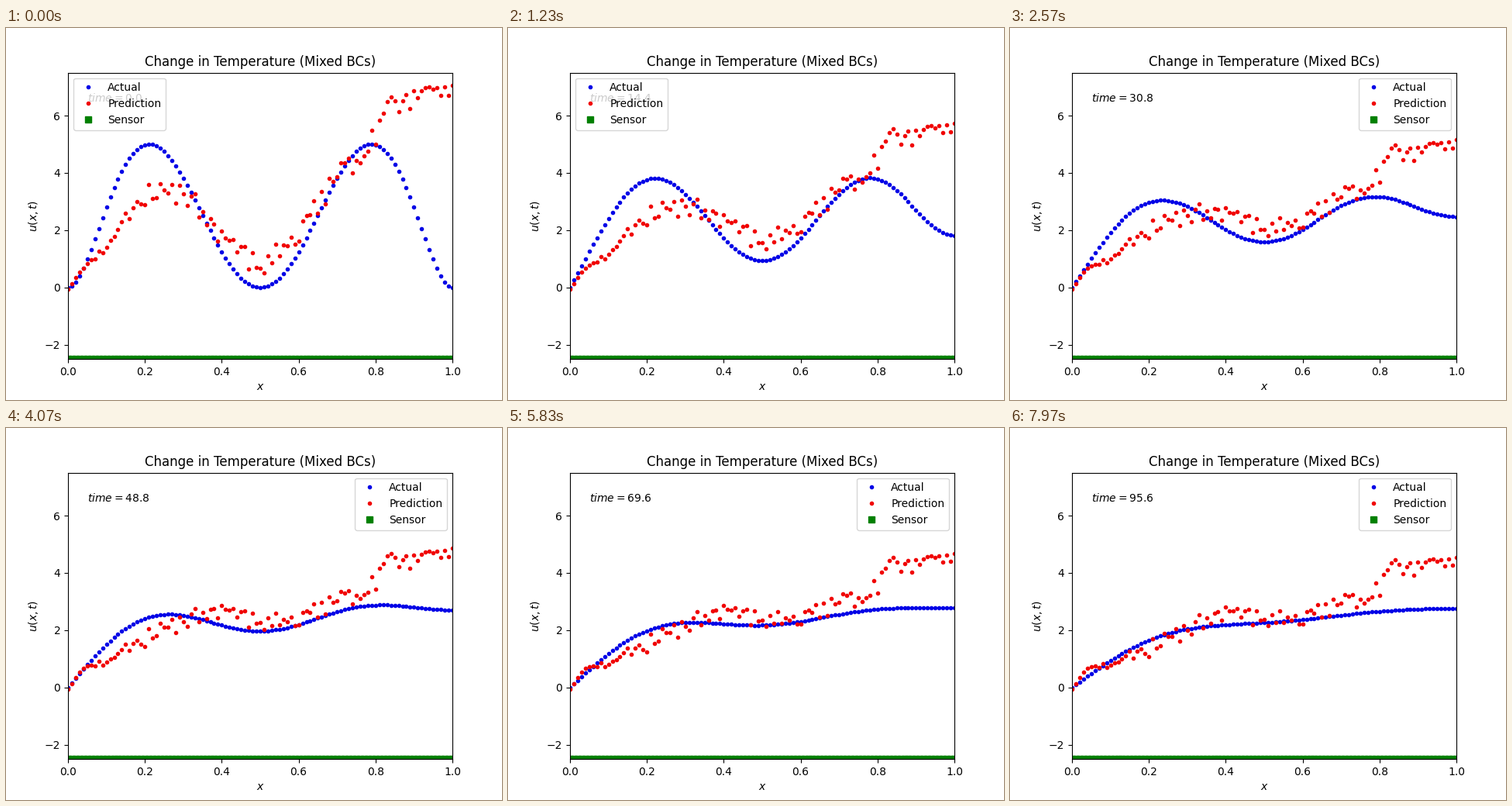
A matplotlib script that plays this animation: 640 px wide and 480 px high, repeating every 8 s.

```python
import numpy as np
import matplotlib.pyplot as plt
from matplotlib.animation import FuncAnimation

FRAMES = 240
LOOP_MS = 8000
DT = 0.4             # simulated time per frame
ALPHA = 3e-4         # diffusivity
LEGEND_SWITCH = 62   # the scatter has dropped clear of the right corner

x = np.linspace(0, 1, 101)

# Heat equation with u(0) = 0 and u_x(1) = 0, solved by a sine series
s = np.linspace(0, 1, 2001)
u0 = 2160 * (s * (1 - s) * (s - 0.5)) ** 2
wave = (np.arange(80) + 0.5) * np.pi
coef = 2 * (np.sin(np.outer(wave, s)) @ u0) * (s[1] - s[0])
modes = np.sin(np.outer(x, wave))

# Prediction: a settled level, parts that fade at different rates, and scatter
keys = [0, 0.04, 0.1, 0.2, 0.3, 0.4, 0.5, 0.6, 0.7, 0.8, 0.81, 0.9, 1]
level = np.interp(x, keys, [-0.05, 0.72, 0.8, 1.35, 2.09, 2.59, 2.4,
                            2.43, 2.86, 3.47, 4.08, 4.25, 4.55])
main = np.interp(x, keys, [0, 0, 0.43, 1.16, 0.6, -1.41, -1.79,
                           -0.57, 0.89, 1.7, 1.68, 1.35, 1.16])
slow = np.interp(x, keys, [0, 0, 0.22, 0.73, 0.7, 0.51, 0.08,
                           0.05, 0.03, 0.16, 0.18, 0.35, 0.6])
quick = 0.76 * np.clip((x - 0.8) / 0.1, 0, 1)
noise = np.random.default_rng(3).uniform(-0.34, 0.34, x.size) * np.minimum(1, 4 * x)


def actual(t):
    return modes @ (coef * np.exp(-ALPHA * wave ** 2 * t))


def fade(k, t):
    """Decay of the k-th cosine mode, from 1 at the start to 0 at the end."""
    rate = ALPHA * (2 * np.pi * k) ** 2
    last = np.exp(-rate * DT * (FRAMES - 1))
    return (np.exp(-rate * t) - last) / (1 - last)


def prediction(t):
    drift = slow * fade(1, t) + main * fade(2, t) + quick * fade(3, t)
    return level + drift + noise * (1 + 0.3 * fade(2, t))


fig, ax = plt.subplots(figsize=(6.4, 4.8), dpi=100)
blue, = ax.plot(x, actual(0), ".", color="#0000e6", label="Actual")
red, = ax.plot(x, prediction(0), ".", color="#f00000", label="Prediction")
ax.plot(x, np.full_like(x, -2.5), "gs", label="Sensor")
ax.set_xlim(0, 1)
ax.set_ylim(-2.5, 7.5)
ax.set_xlabel("$x$")
ax.set_ylabel("$u(x,t)$")
ax.set_title("Change in Temperature (Mixed BCs)")
clock = ax.text(0.05, 6.5, "")
legend = ax.legend(loc="upper left")


def update(i):
    t = i * DT
    blue.set_ydata(actual(t))
    red.set_ydata(prediction(t))
    clock.set_text(f"$time = {t:.1f}$")
    legend.set_loc("upper left" if i < LEGEND_SWITCH else "upper right")
    return blue, red, clock, legend


anim = FuncAnimation(fig, update, frames=FRAMES, interval=LOOP_MS / FRAMES,
                     repeat=True, repeat_delay=0)
plt.show()
```
